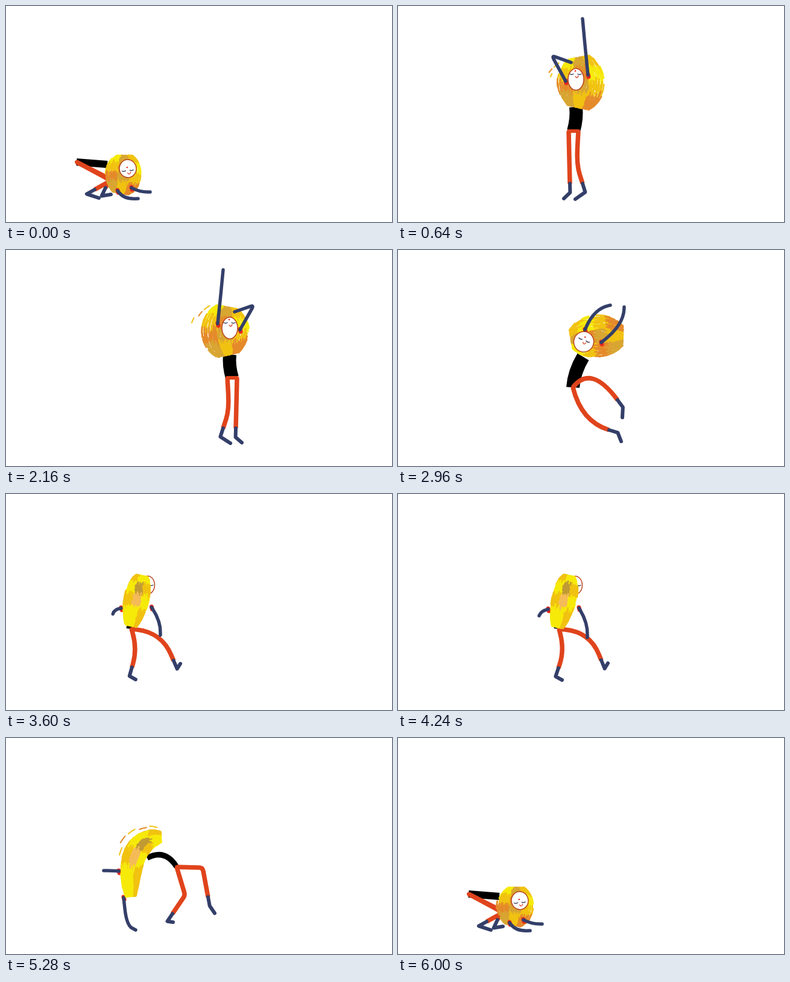
An HTML page with a canvas that plays this animation: 640 px wide and 360 px high, repeating every 6.08 s.

```html
<!DOCTYPE html>
<html lang="en">
<head>
<meta charset="utf-8">
<title>Dancer</title>
<style>
html, body { margin: 0; width: 100%; height: 100%; overflow: hidden; background: #fff; }
canvas { display: block; width: 100vw; height: 100vh; }
</style>
</head>
<body>
<canvas id="stage" width="640" height="360"></canvas>
<script>
const ctx = document.getElementById('stage').getContext('2d');
const LOOP = 6080, STEP = 80, FLOOR = 324;
const ORANGE = '#e0441c', NAVY = '#343f69', RED = '#e8281a';
const YELLOW = '#f6ea0a', GOLD = '#f1c211', OCHRE = '#e58a2a', TAN = '#d8a632', OLIVE = '#c09a34', PEACH = '#f5bb58';
const tones = {
  warm: [GOLD, OCHRE, TAN, GOLD, OCHRE, YELLOW, TAN],
  bright: [YELLOW, GOLD, PEACH, YELLOW, OLIVE, GOLD, YELLOW]
};

// body: hip, bend, chest; leg: knee, ankle, toe; arm: shoulder, elbow, hand;
// hair: the curve its strands follow; soft: roundness of knees and elbows
const basic = { size: [14, 15], tilt: -.1, gaze: 0, pelvis: 0, soft: [.8, .9], loose: 0, back: 0, tone: 'warm' };

const crouch = { ...basic, soft: [.2, .8], gaze: 3,
  head: [202, 271], girth: 12, body: [[117, 260], [142, 262], [168, 264]],
  legs: [[[174, 291], [147, 306], [154, 320]], [[172, 288], [165, 303], [174, 314]]],
  arms: [[[185, 308], [196, 322], [219, 321]], [[208, 303], [222, 310], [239, 310]]],
  hair: [[196, 249], [196, 280], [190, 312]], volume: 60 };

const sway = { ...basic, soft: [.3, 1], pelvis: 13,
  head: [376, 150], girth: 30, body: [[369, 230], [362, 198], [367, 165]],
  legs: [[[368, 268], [363, 301], [363, 325]], [[394, 268], [386, 301], [391, 322]]],
  arms: [[[355, 158], [318, 127], [300, 158]], [[396, 135], [402, 75], [437, 91]]],
  hair: [[372, 129], [383, 160], [403, 205]], volume: 58 };

const reach = { ...basic, soft: [.5, .15], pelvis: 8, size: [13, 18], tilt: 0, gaze: -9, loose: 3,
  head: [371, 130], girth: 22, body: [[375, 213], [369, 193], [371, 174]],
  legs: [[[370, 266], [360, 297], [372, 322]], [[382, 258], [381, 297], [391, 321]]],
  arms: [[[351, 123], [356, 75], [360, 33]], [[388, 133], [411, 92], [379, 103]]],
  hair: [[367, 95], [359, 135], [368, 175]], volume: 78 };

const leap = { ...basic, soft: [1, .9], size: [16.5, 17], tilt: .4, gaze: -3,
  head: [308, 153], girth: 22, body: [[290, 229], [292, 203], [307, 178]],
  legs: [[[304, 286], [350, 300], [370, 319]], [[320, 190], [364, 250], [372, 279]]],
  arms: [[[310, 133], [325, 98], [352, 92]], [[337, 154], [374, 125], [375, 95]]],
  hair: [[287, 150], [330, 142], [373, 143]], volume: 70 };

const walk = { ...basic, back: 1, tone: 'bright', size: [11.5, 15], tilt: 0,
  head: [294, 152], girth: 17, body: [[267, 225], [269, 208], [272, 190]],
  legs: [[[276, 260], [266, 290], [272, 310]], [[318, 230], [337, 277], [348, 282]]],
  arms: [[[249, 192], [237, 195], [234, 203]], [[300, 190], [315, 215], [314, 239]]],
  hair: [[284, 136], [277, 168], [264, 222]], volume: 41 };

const bridge = { ...basic, back: 1, tone: 'bright', soft: [.12, .6], size: [8, 10], loose: 5,
  head: [208, 215], girth: 9, body: [[283, 215], [264, 184], [234, 200]],
  legs: [[[297, 262], [276, 293], [277, 307]], [[326, 216], [335, 265], [346, 292]]],
  arms: [[[187, 222], [175, 221], [162, 221]], [[195, 266], [200, 312], [215, 320]]],
  hair: [[257, 165], [199, 168], [207, 264]], volume: 39 };

// Moves a pose sideways, mirrors it about the head or stretches it up from the floor.
function turn(pose, dx, side = 1, grow = 1) {
  const cx = pose.head[0];
  const place = p => Array.isArray(p[0]) ? p.map(place)
    : [cx + dx + (p[0] - cx) * side, FLOOR - (FLOOR - p[1]) * grow];
  const moved = { ...pose, tilt: pose.tilt * side };
  for (const part of ['head', 'body', 'legs', 'arms', 'hair']) moved[part] = place(pose[part]);
  if (side < 0) for (const pair of ['legs', 'arms']) moved[pair].reverse();
  return moved;
}
const swapLegs = pose => ({ ...pose, legs: [...pose.legs].reverse() });

const keys = [
  [0, crouch], [640, turn(reach, -76, -1, 1.04)], [1200, sway],
  [1680, turn(reach, 6, -1, 1.04)], [2160, reach], [2480, turn(reach, 0, -1, 1.03)],
  [2960, leap], [3200, turn(leap, -38, 1, 1.08)], [3640, swapLegs(turn(walk, -60))],
  [4240, walk], [4720, swapLegs(turn(walk, 18))], [5280, bridge],
  [5520, turn(bridge, 10, -1)], [5840, crouch], [LOOP, crouch]
];

function mix(a, b, u) {
  if (typeof a === 'number') return a + (b - a) * u;
  if (typeof a === 'string') return u < .5 ? a : b;
  if (Array.isArray(a)) return a.map((v, i) => mix(v, b[i], u));
  return Object.fromEntries(Object.keys(a).map(k => [k, mix(a[k], b[k], u)]));
}

function poseAt(t) {
  const i = keys.findIndex(k => k[0] > t) - 1;
  const [t0, a] = keys[i], [t1, b] = keys[i + 1];
  const u = (t - t0) / (t1 - t0);
  return mix(a, b, u * u * (3 - 2 * u));
}

let seed = 1;
const rnd = () => (seed = seed * 16807 % 2147483647) / 2147483647;

function stroke(color, width, trace, cap = 'round') {
  ctx.beginPath();
  trace();
  Object.assign(ctx, { strokeStyle: color, lineWidth: width, lineCap: cap, lineJoin: 'round' });
  ctx.stroke();
}

const line = (color, width, ...points) =>
  stroke(color, width, () => points.forEach(p => ctx.lineTo(...p)));

const limb = (color, width, [from, joint, to], soft, cap) => stroke(color, width, () => {
  ctx.moveTo(...from);
  ctx.lineTo(...mix(joint, from, soft));
  ctx.quadraticCurveTo(...joint, ...mix(joint, to, soft));
  ctx.lineTo(...to);
}, cap);

function drawLegs({ legs, body, pelvis, soft }) {
  const [x, y] = body[0];
  const hips = [[x - pelvis, y], [x + pelvis, y]];
  line(ORANGE, 6, ...hips);
  legs.forEach(([knee, ankle, toe], i) => {
    limb(ORANGE, 7.5, [hips[i], knee, ankle], soft[0], 'butt');
    const heel = mix(ankle, knee, -15 / Math.hypot(ankle[0] - knee[0], ankle[1] - knee[1]));
    line(NAVY, 6, ankle, heel, toe);
  });
}

function drawHair({ hair: [root, bend, tip], volume, loose, tone }) {
  // s runs along the hair, v across it from -1 to 1
  const at = (s, v) => {
    const a = mix(root, bend, s), b = mix(bend, tip, s), [x, y] = mix(a, b, s);
    const dx = b[0] - a[0], dy = b[1] - a[1];
    const off = v * volume / 2 * Math.sin(Math.PI * mix(.06, .94, s)) ** .45 / Math.hypot(dx, dy);
    return [x - dy * off, y + dx * off];
  };
  const strand = (color, width, s, v, len) => {
    const ends = [s - len / 2, s, s + len / 2].map(k => at(Math.min(1, Math.max(0, k)), v));
    line(color, width, ...ends);
  };
  const colors = tones[tone], count = 280;
  for (let i = 0; i < count; i++) {
    const s = (i + rnd()) / count, v = i * .618034 % 1 * 2 - 1;
    const patch = Math.floor(s * 4) + 4 * Math.floor((v + 1) * 1.5);
    strand(colors[patch * 5 % 7], 2 + rnd(), s, v * (.94 + rnd() * .1), .12 + rnd() * .12);
  }
  for (let i = 0; i < Math.round(loose); i++) {
    strand(i % 2 ? OCHRE : GOLD, 2, .08 + i * .12, 1.2 + rnd() * .4, .08);
  }
}

function drawFace({ head, size, tilt, gaze }) {
  ctx.save();
  ctx.translate(...head);
  ctx.rotate(tilt);
  ctx.beginPath();
  ctx.ellipse(0, 0, ...size, 0, 0, 7);
  ctx.fillStyle = '#fff';
  ctx.fill();
  ctx.strokeStyle = '#b8441f';
  ctx.lineWidth = 1.5;
  ctx.stroke();
  ctx.translate(0, gaze);
  for (const x of [-7, 6]) limb('#2c2c48', 1.3, [[x - 3, 0], [x, 2], [x + 3, 0]], 1);
  limb('#d83a22', 1.3, [[-1, 4], [2, 9], [4, 3]], 1);
  line(RED, 2.5, [-1, -5], [-1, -5]);
  ctx.restore();
}

function draw(now) {
  const frame = Math.floor(now % LOOP / STEP);
  const pose = poseAt(frame * STEP);
  const tassels = () => pose.arms.forEach(([[x, y]]) => line(RED, 7, [x, y - 1], [x + 1, y + 3]));
  const front = [() => drawHair(pose), tassels, () => drawFace(pose)];
  seed = 977 + frame * 7919;
  ctx.fillStyle = '#fff';
  ctx.fillRect(0, 0, 640, 360);
  limb('#000', pose.girth, pose.body, 1, 'butt');
  drawLegs(pose);
  // seen from behind, the hair covers the face
  if (pose.back > .5) front.reverse();
  front.forEach(part => part());
  for (const arm of pose.arms) limb(NAVY, 5.5, arm, pose.soft[1]);
}

function tick() {
  draw(performance.now());
  requestAnimationFrame(tick);
}
tick();
</script>
</body>
</html>
```
